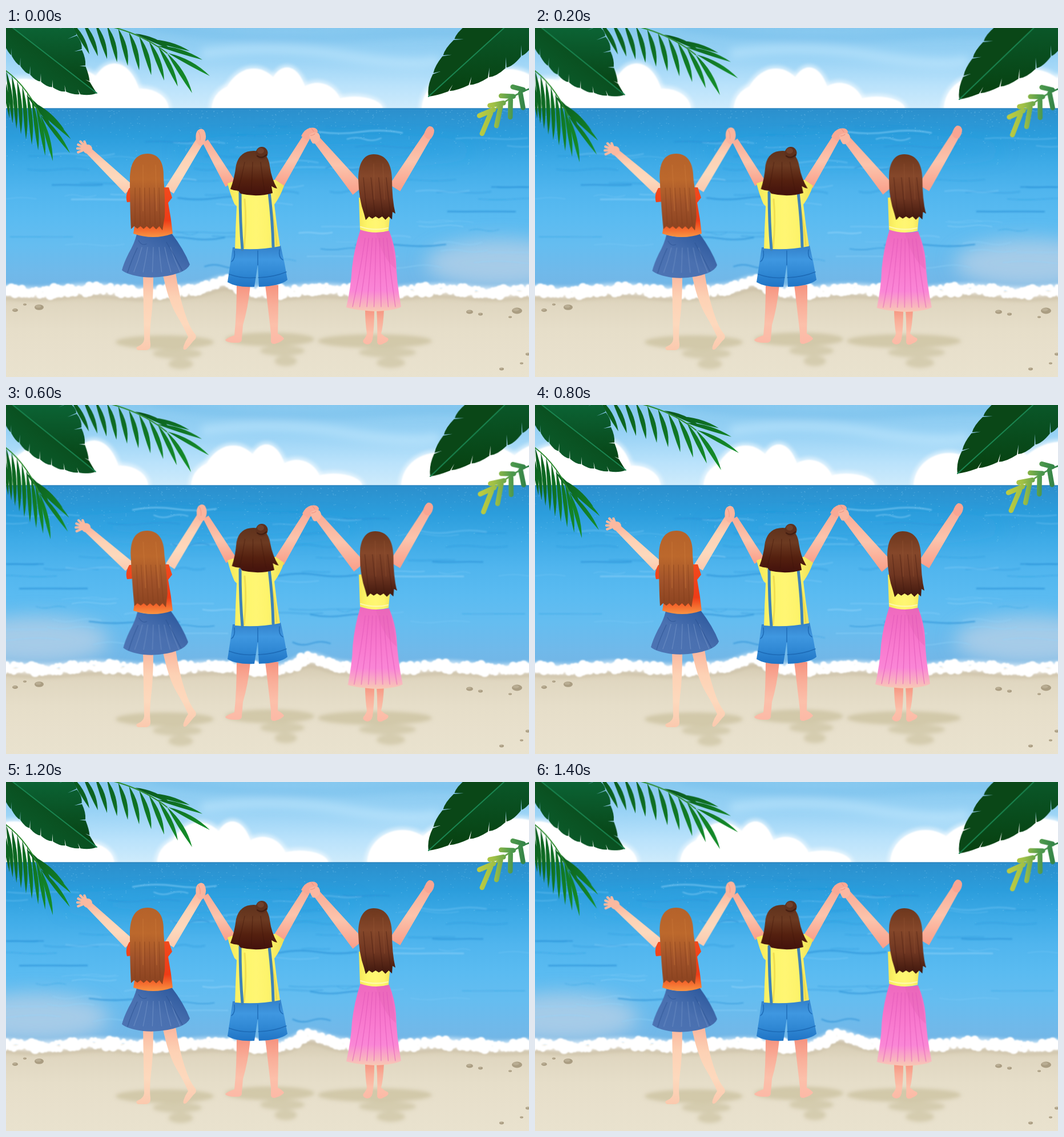
Recreate the animation shown at these times as an HTML page. Size 916 px wide and 611 px high, loop 1.6 s.

```html
<!DOCTYPE html>
<html lang="en">
<head>
<meta charset="utf-8">
<title>Beach</title>
<style>
html,body{margin:0;width:100%;height:100%;overflow:hidden;background:#e8e1cc}
svg{display:block;width:100%;height:100%}
.sway{animation:sway .4s step-end infinite}
.sea{animation:flip .8s step-end infinite}
.clouds{animation:drift 1.6s step-end infinite}
@keyframes sway{0%{transform:none}50%,100%{transform:var(--to)}}
@keyframes flip{0%{transform:none}50%,100%{transform:matrix(-1,0,0,1,916,0)}}
@keyframes drift{
0%{transform:translateX(0);animation-timing-function:steps(3)}
37.5%{transform:translateX(-36px)}
50%{transform:translateX(-65px)}
62.5%{transform:translateX(-85px);animation-timing-function:steps(2)}
87.5%,100%{transform:translateX(-106px)}
}
</style>
</head>
<body>
<svg id="stage" viewBox="0 0 916 611" preserveAspectRatio="none"></svg>
<script>
let seed = 7;
const rnd = (a = 0, b = 1) => a + (b - a) * (seed = seed * 16807 % 2147483647) / 2147483647;
const n1 = v => Math.round(v * 10) / 10;
const loop = (n, f) => Array.from({length: n}, (_, i) => f(i, n > 1 ? i / (n - 1) : 0)).join('');
const mix = (a, b, t) => a + (b - a) * t;

// SVG helpers
const grad = (id, colors, dir = 'x2="0" y2="1"') => `<linearGradient id="${id}" ${dir}>` +
  colors.map((c, i) => `<stop offset="${i / (colors.length - 1)}" stop-color="${c}"/>`).join('') + '</linearGradient>';
const blur = (id, s) => `<filter id="${id}" x="-30%" y="-60%" width="160%" height="220%"><feGaussianBlur stdDeviation="${s}"/></filter>`;
const shape = (d, fill, o = 1) => `<path d="${d}" fill="${fill}" opacity="${o}"/>`;
const line = (d, color, w, o = 1) => `<path d="${d}" fill="none" stroke="${color}" stroke-width="${n1(w)}" stroke-linecap="round" stroke-linejoin="round" opacity="${o}"/>`;
const oval = (x, y, rx, ry, fill, o = 1) => `<ellipse cx="${n1(x)}" cy="${n1(y)}" rx="${n1(rx)}" ry="${n1(ry)}" fill="${fill}" opacity="${o}"/>`;
const soft = (id, body) => `<g filter="url(#${id})">${body}</g>`;
const sway = (to, body) => `<g class="sway" style="--to:${to}">${body}</g>`;
const turn = (a, x, y) => `translate(${x}px,${y}px) rotate(${a}deg) translate(${-x}px,${-y}px)`;

const defs = '<defs>' +
  grad('sky', ['#86c8ef', '#98d2f5', '#b9e2fb', '#d3edfc']) +
  grad('water', ['#2c8fcc', '#2b9ddc', '#3eabe7', '#50b5ee', '#5abbf1', '#65bdf0', '#70b9ea', '#74b3e3']) +
  grad('sand', ['#d0c5ab', '#e0d7c1', '#e6dec9', '#e8e0cc', '#e9e2ce']) +
  grad('skin1', ['#fab59d', '#fdd2b5', '#fdd9bd', '#fbc9ae']) +
  grad('skin2', ['#f9ab96', '#fcc4ac', '#f99d88']) +
  grad('leg2', ['#f6937f', '#f9ae99', '#fcc0aa', '#fcb9a6']) +
  grad('hair1', ['#b5622a', '#bc682c', '#a0522a', '#8a421f']) +
  grad('hair2', ['#5f321c', '#6c3a21', '#54200f', '#42110c']) +
  grad('hair3', ['#6d371d', '#85472a', '#6f3621', '#3e160d']) +
  grad('red', ['#f34a1d', '#f0421a', '#ee3c17', '#f99442']) +
  grad('denim', ['#4d74b4', '#4a70b0', '#28559a'], 'x1="0" y1="1" x2=".9" y2="0"') +
  grad('yellow', ['#f6e659', '#fdf669', '#fff673', '#fdf36a', '#eede55'], 'x2="1" y2="0"') +
  grad('shorts', ['#327fc9', '#3f97e0', '#3088d4', '#2074c5']) +
  grad('pink', ['#ee69bd', '#f470c7', '#f97acf', '#fa86d6', '#f8c9b4']) +
  grad('dark', ['#07400f', '#0a5020', '#0b6535'], 'x1="1" y1="0" x2="0" y2="1"') +
  grad('teal', ['#0c6a3b', '#0a5527', '#07400f']) +
  grad('frond', ['#0a561e', '#15902a'], 'x2="1" y2="1"') +
  grad('twig', ['#c2ce3f', '#a0c046', '#4f9a4d', '#2b7d45'], 'gradientUnits="userSpaceOnUse" x1="823" y1="0" x2="916" y2="0"') +
  blur('b1', 1.2) + blur('b3', 3) + blur('b7', 7) + blur('b16', 16) + '</defs>';

const sky = '<rect width="916" height="150" fill="url(#sky)"/>' + soft('b7',
  line('M260 -4Q420 30 640 14T930 30', '#74bdeb', 12, .5) +
  line('M350 44Q470 28 590 48T750 58', '#c4e9fd', 18, .5));

// Each cloud is a row of domes on the horizon: centre, half width, height
const domes = [[30, 70, 55], [110, 80, 75], [190, 50, 82], [237, 50, 38],
  [402, 44, 44], [434, 58, 73], [492, 40, 75], [545, 46, 48], [610, 52, 24],
  [790, 64, 60], [880, 75, 72], [990, 90, 80]];
const heap = (grow, o) => domes.map(([x, w, h]) => oval(x, 142, w + grow, h + grow, '#fff', o)).join('');
const clouds = '<g class="clouds">' + soft('b3', heap(3, .5)) + soft('b1', heap(-2, 1)) + '</g>';

// Sea, foam and wet edge of the sand
const coast = x => 459 + 3 * Math.sin(x / 32) - 15 * Math.exp(-(((x - 385) / 30) ** 2));
const edge = 'M-6 461' + loop(94, i => `L${i * 10} ${n1(coast(i * 10))}`);
const swell = (n, o, size) => loop(n, i => {
  const y = rnd(170, 425), w = rnd(.5, 1.5) * size, h = rnd(-6, 6);
  return line(`M${n1(rnd(-40, 900))} ${n1(y)}q${n1(w / 4)} ${n1(h)} ${n1(w / 2)} 0t${n1(w / 2)} ${n1(h / 3)}`,
    i % 2 ? '#92d3f9' : '#278fd6', rnd(1.2, 3.2), o);
});
const specks = loop(400, () => `M${n1(rnd(0, 916))} ${n1(144 + 110 * rnd() * rnd())}h1`);
const foam = loop(300, i => {
  const x = (i % 150) * 6.2 - 3, r = rnd(4, 6.5) + 2.5 * Math.max(0, Math.sin(x / 10.4));
  return oval(x, coast(x) + rnd(-3, 4) + (i < 150 ? -3 : 4), r, r, '#fff');
});
const sea = '<g class="sea"><rect y="140.5" width="916" height="336" fill="url(#water)"/>' +
  soft('b16', oval(865, 412, 130, 42, '#b4d0e8', .8) + oval(560, 215, 260, 14, '#2f9fe4', .5)) +
  line('M0 141.2H916', '#2277b3', 1.2, .7) + line(specks, '#8fd0f4', 1.1, .35) +
  soft('b1', swell(44, .28, 90) + swell(22, .55, 110)) +
  shape(edge + 'V611H-6Z', 'url(#sand)') +
  soft('b3', `<g transform="translate(0 12)">${line(edge, '#bcae92', 7, .5)}</g>` + line(edge, '#fff', 18, .6)) +
  soft('b1', foam) + '</g>';

const shade = soft('b3', [[278, 550, 86], [462, 545, 78], [646, 548, 100]].map(([x, y, w]) =>
  oval(x, y, w, 12, '#c9bf9c', .7) + oval(x + 22, y + 20, w * .5, 9, '#c9bf9c', .6) + oval(x + 28, y + 38, w * .25, 9, '#c9bf9c', .6)).join(''));
const stones = [[16, 494, 5], [33, 484, 3], [58, 489, 8], [812, 497, 6], [831, 501, 4], [883, 506, 3], [895, 495, 9], [903, 587, 3], [914, 571, 4], [868, 597, 4]]
  .map(([x, y, r]) => oval(x, y, r, r * .6, '#aa9d82') + oval(x - r * .2, y - r * .2, r * .6, r * .3, '#b9ad93')).join('');

// A tapered limb from hand to shoulder
function limb(x1, y1, w1, x2, y2, w2, skin) {
  const l = Math.hypot(x2 - x1, y2 - y1), nx = (y1 - y2) / l / 2, ny = (x2 - x1) / l / 2;
  const p = (x, y, w) => `${n1(x + nx * w)} ${n1(y + ny * w)}`;
  const mx = mix(x1, x2, .5), my = mix(y1, y2, .5), wm = mix(w1, w2, .55);
  return shape(`M${p(x1, y1, w1)}Q${p(mx, my, wm)} ${p(x2, y2, w2)}L${p(x2, y2, -w2)}Q${p(mx, my, -wm)} ${p(x1, y1, -w1)}Z`, `url(#${skin})`);
}
const fingers = loop(5, (i, t) => {
  const a = mix(2.75, 4.35, t), l = i == 4 ? 13 : 17;
  return `M142 211l${n1(l * Math.cos(a))} ${n1(l * Math.sin(a))}`;
});
const arms =
  sway(turn(-2.2, 215, 285), limb(145, 215, 12, 216, 283, 20, 'skin1') + oval(143, 212, 8, 8, '#fbb9a0') + line(fingers, '#fbb9a0', 4.2)) +
  sway('translate(1px,-1.5px)', limb(349, 198, 11, 393, 273, 20, 'skin2')) +
  sway('translate(1.5px,-2.5px)', limb(340, 197, 14, 286, 285, 18, 'skin1') +
    shape('M333 198Q331 184 336 179Q342 174 347 179Q352 187 349 197Q346 206 341 206Q336 205 333 198Z', '#fbb49d') +
    line('M337 181Q341 187 340 196', '#f08f7d', 1.1, .7)) +
  sway('translate(1px,1px)', limb(527, 190, 13, 477, 274, 20, 'skin2')) +
  sway('translate(2px,-.5px)', limb(542, 193, 13, 617, 284, 25, 'skin2')) +
  sway('translate(2px,1px)',
    shape('M517 189Q523 177 532 175Q543 173 546 180Q546 188 537 191L527 197Z', '#f9a995') +
    shape('M531 187Q539 181 547 184Q552 190 549 197Q543 204 537 202Q532 195 531 187Z', '#fbb7a1') +
    line('M535 176L539 181M533 188Q538 188 541 185', '#ea8c7b', 1.1, .7)) +
  sway(turn(-1, 680, 290), limb(740, 186, 14, 681, 280, 22, 'skin2') +
    shape('M732 187Q735 175 741 172Q748 171 750 179Q750 187 744 194Q736 196 732 187Z', '#f9a592'));

// Ragged hair ends and evenly fanned strands
const fringe = (x1, x2, y, n, d) => loop(n, (i, t) => `L${n1(mix(x1, x2, t))} ${i % 2 ? y - d : y + rnd(-2, 2)}`);
const fan = (n, a1, a2, ya, b1, b2, yb, color, o) => line(loop(n, (i, t) => {
  const a = mix(a1, a2, t), b = mix(b1, b2, t);
  return `M${n1(a)} ${ya}Q${n1(mix(a, b, .4))} ${mix(ya, yb, .5)} ${n1(b)} ${yb}`;
}), color, 1.3, o);

const girl1 =
  shape('M274 428L297 428Q303 468 313 498Q321 524 332 537Q335 543 328 548Q322 556 316 562Q309 566 311 557Q314 548 319 541Q311 523 299 503Q284 478 274 428Z', 'url(#skin1)') +
  shape('M240 428L258 428Q258 480 254 510Q251 540 253 553Q254 563 246 564L231 564Q225 560 232 557Q241 553 242 545Q241 500 240 428Z', 'url(#skin1)') +
  sway('translate(257px,1px) scaleX(.955) translate(-257px,0)',
    shape('M229 361Q260 370 289 358Q312 388 322 414Q319 422 305 428Q275 439 240 436Q212 432 203 424Q206 412 215 394Q225 377 229 361Z', 'url(#denim)') +
    fan(6, 238, 288, 384, 224, 305, 427, '#7d9bcd', .5) +
    line('M232 372Q238 382 246 378M230 385Q219 408 213 428M281 375Q296 400 309 425', '#284f8f', 1.3, .55)) +
  shape('M216 280Q208 293 212 305L223 304Q229 332 223 360Q258 372 292 360Q289 332 284 306L291 297L285 279Z', 'url(#red)') +
  sway('matrix(1,0,.05,1,-11.7,0)',
    shape('M217 265C217 235 228 220 248 220C268 220 277 236 276 262Q279 300 278 330' + fringe(274, 219, 353, 11, 6) + 'Q217 320 217 265Z', 'url(#hair1)') +
    fan(6, 226, 268, 280, 226, 270, 344, '#7c3a1a', .4) + fan(2, 240, 262, 240, 240, 264, 320, '#cd7d3c', .5));

const girl2 =
  shape('M404 450L428 450Q424 490 415 520L413 544Q414 552 402 551Q386 551 384 546Q390 541 400 538Q404 500 404 450Z', 'url(#leg2)') +
  shape('M454 450L477 450Q477 500 476 535Q484 539 487 544Q484 549 471 553Q463 554 464 546L464 535Q459 490 454 450Z', 'url(#leg2)') +
  shape('M397 384L481 381Q488 410 493 441Q480 452 443 453L441 414L435 453Q405 455 388 445Q393 412 397 384Z', 'url(#shorts)') +
  line('M391 431Q412 439 437 437M442 437Q470 436 491 427M400 390Q402 404 395 409M479 388Q477 402 485 406M441 390V415', '#1964b0', 1.5, .8) +
  shape('M388 272L400 268L472 266L487 276Q480 296 470 309Q474 346 480 382Q440 390 401 386Q402 350 404 312L400 308Q393 292 388 272Z', 'url(#yellow)') +
  line('M418 300Q422 340 417 384M464 310Q472 350 474 380', '#e8cf42', 3, .6) +
  line('M410 288Q410 340 414 388M461 288Q467 340 468 383', '#3f83b8', 5) +
  sway('matrix(1,0,.045,1,-10.1,0)',
    shape('M393 282Q400 264 403 240Q409 215 434 215Q459 215 462 242Q465 264 475 281Q469 280 465 277L467 289Q440 297 411 290L407 285Q400 285 393 282Z', 'url(#hair2)') +
    fan(3, 418, 446, 235, 406, 453, 286, '#3c150c', .4)) +
  oval(448, 219, 10.5, 11, '#5e301c') + oval(446, 215, 6, 5, '#70402a') + line('M440 224Q448 230 456 222', '#35150c', 2, .7);

const girl3 =
  shape('M629 492L645 492Q645 525 642 545Q640 554 632 554Q623 551 626 546Q631 540 632 535Q629 515 629 492Z', 'url(#leg2)') +
  shape('M649 492L662 492Q661 520 657 535Q662 540 669 543Q672 548 662 552Q652 558 650 550Q651 520 649 492Z', 'url(#leg2)') +
  sway('matrix(1,0,.021,1,-7.5,1)',
    shape('M621 352Q645 360 671 355Q681 380 683 405Q684 445 692 488Q680 495 645 496Q610 494 596 489Q604 455 606 420Q610 385 621 352Z', 'url(#pink)') +
    shape('M648 358L671 355Q679 390 683 422Q660 405 648 358Z', '#df60b1', .3) +
    fan(7, 629, 667, 368, 607, 682, 488, '#df58b7', .6)) +
  shape('M618 297L677 292Q672 330 670 355Q645 362 620 353Z', 'url(#yellow)') +
  line('M621 348Q645 356 669 350', '#fffbc0', 2, .8) +
  sway('translate(2.5px,0)',
    shape('M617 265C617 236 627 221 644 221C665 221 675 237 676 263Q676 300 682 325L677 322' + fringe(676, 630, 335, 9, 5) + 'L627 325Q618 300 617 265Z', 'url(#hair3)') +
    fan(4, 626, 666, 262, 633, 674, 329, '#3f190f', .42) + fan(2, 644, 660, 238, 645, 663, 300, '#9a5a38', .4));

// Palm frond: n blades whose roots and tips each run along a quadratic curve
const curve = (c, t) => [0, 1].map(k => mix(mix(c[k], c[k + 2], t), mix(c[k + 2], c[k + 4], t), t));
const frond = (roots, tips, n, w, bow) => shape(loop(n, (i, t) => {
  const [x1, y1] = curve(roots, t), [x2, y2] = curve(tips, t), l = Math.hypot(x2 - x1, y2 - y1);
  const side = s => `${n1((x1 + x2) / 2 - (y2 - y1) / l * s)} ${n1((y1 + y2) / 2 + (x2 - x1) / l * s)}`;
  return `M${n1(x1)} ${n1(y1)}Q${side(bow + w)} ${n1(x2)} ${n1(y2)}Q${side(bow - w)} ${n1(x1)} ${n1(y1)}`;
}), 'url(#frond)');
const topStem = [112, -12, 215, -8, 282, 44], sideStem = [-10, 68, 32, 94, 60, 152];
const topFrond = sway(turn(1, 130, 0),
  frond(topStem, [146, 46, 210, 60, 326, 114], 10, 8, -5) +
  frond([226, 10, 255, 24, 284, 44], [290, 38, 345, 32, 357, 84], 4, 7, -5) +
  line('M112 -12Q215 -8 282 44', '#2b8a2b', 2));
const sideFrond = sway(turn(1.4, 0, 70),
  frond(sideStem, [6, 158, 26, 195, 82, 233], 9, 7, -4) +
  frond([36, 118, 48, 132, 60, 152], [78, 170, 124, 176, 112, 219], 4, 7, -4) +
  line('M-10 68Q32 94 60 152', '#2b8a2b', 2));

// Broad leaf with slit edges; each side has its own width and fullness
function broad(x1, y1, x2, y2, sides) {
  const dx = x2 - x1, dy = y2 - y1, l = Math.hypot(dx, dy);
  const at = (s, w) => `${n1(x1 + dx * s - dy / l * w)} ${n1(y1 + dy * s + dx / l * w)}`;
  return sides.map(([w, power, fill]) => {
    const n = 10, reach = s => w * Math.sin(Math.PI * Math.min(s, 1)) ** power;
    const lobes = loop(n, i => {
      const a = i / n, b = (i + 1) / n;
      return `L${at(a + .006, reach(a + .006))}Q${at(b - .03, reach(b - .04) * 1.08)} ${at(b, reach(b))}L${at(b - .035, reach(b) * .74)}`;
    });
    return shape(`M${at(0, 0)}${lobes}L${at(1, 0)}Z`, fill);
  }).join('') + line(`M${at(0, 0)}L${at(1, 0)}`, '#1a8551', 2);
}
const bigLeft = sway('rotate(1deg)', broad(-20, -25, 159, 114, [[46, .7, 'url(#dark)'], [-64, 1.7, 'url(#teal)']]));
const bigRight = sway(turn(-1.6, 916, 0), broad(990, -107, 740, 120, [[50, .6, '#0a4717'], [-57, 1, 'url(#teal)']]));

const pod = (x, y, deg, l) => `M${n1(x)} ${n1(y)}l${n1(l * Math.cos(deg * Math.PI / 180))} ${n1(l * Math.sin(deg * Math.PI / 180))}`;
const twig = sway(turn(-1.6, 916, 100),
  line('M918 106Q885 118 852 146', 'url(#twig)', 2.6) +
  line(loop(4, (i, t) => {
    const x = mix(906, 854, t), y = mix(112, 147, t);
    return pod(x - 5, y + 2, mix(80, 113, t), mix(26, 39, t)) + pod(x, y - 4, mix(195, 157, t), mix(19, 27, t));
  }), 'url(#twig)', 8.5));

document.getElementById('stage').innerHTML = defs + sky + clouds + sea + shade + stones +
  arms + girl1 + girl2 + girl3 + topFrond + bigLeft + sideFrond + bigRight + twig;
</script>
</body>
</html>
```
